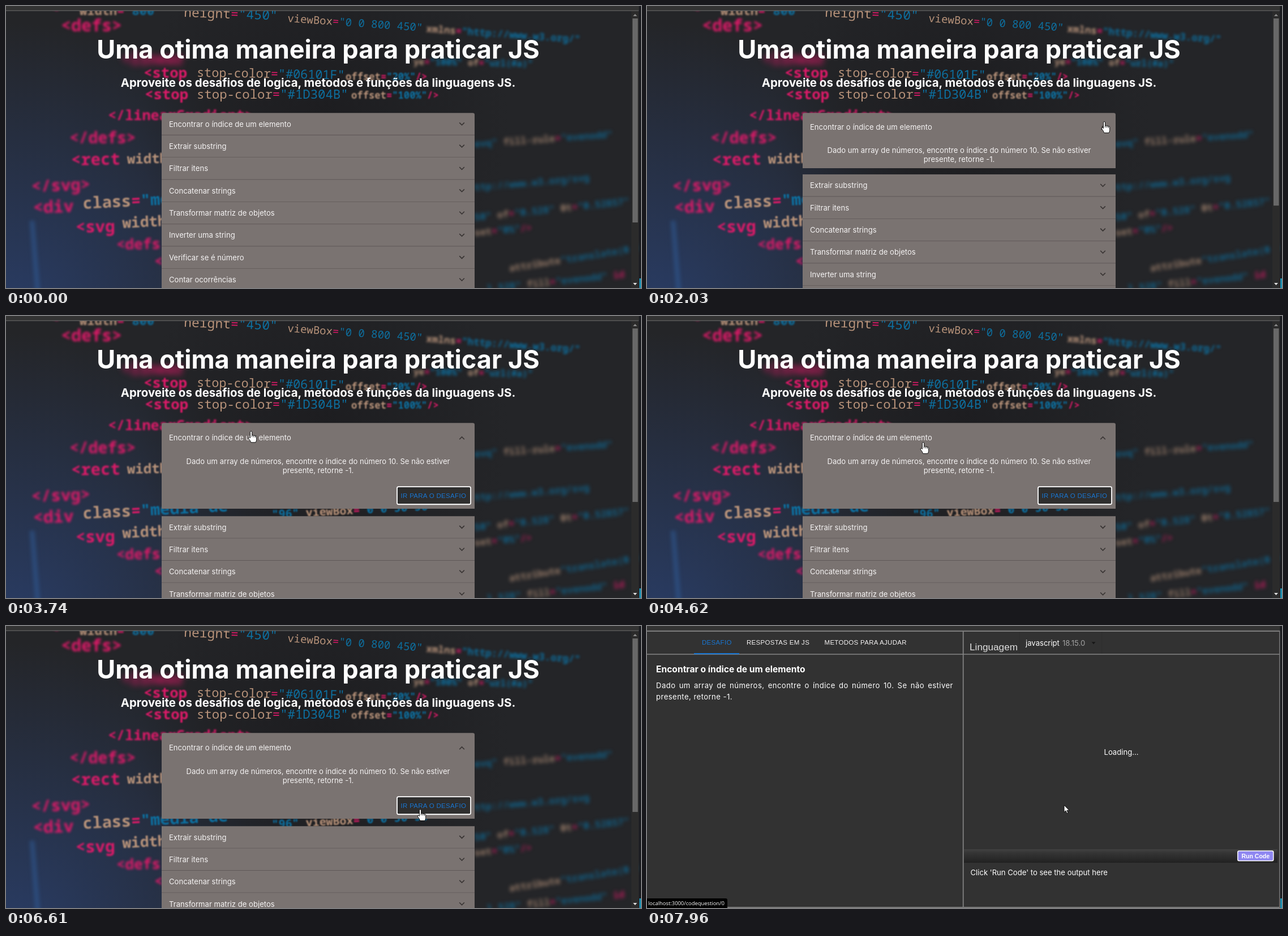
Animation, 1122 px wide and 499 px high, one loop 8000 ms. Source, as an HTML page with a canvas:

```html
<!DOCTYPE html>
<html lang="pt">
<head>
<meta charset="utf-8">
<title>Desafios JS</title>
<style>
  html, body { margin: 0; width: 100%; height: 100%; overflow: hidden; background: #232427; }
  canvas, body > svg { position: absolute; left: 0; top: 0; }
  svg { font: 13.1px Inter, sans-serif; font-optical-sizing: none; fill: #f5f3f3; }
  .mid { text-anchor: middle; }
  .bold { font-weight: 700; }
  .white { fill: #fff; }
  .caps { font: 11.47px "Liberation Sans", Arial, sans-serif; letter-spacing: .33px; }
  .field { font: 17.2px "Liberation Sans", Arial, sans-serif; fill: #dedede; }
  .run { font: bold 10.5px "Liberation Sans", Arial, sans-serif; fill: #fff; }
  .status { font: 9.4px "Open Sans", sans-serif; fill: #fff; }
  .card { fill: #7a7371; }
  .rule { fill: #5f5958; }
  .chevron { fill: #383433; }
  .brief { font: 13.1px/20px Inter, sans-serif; letter-spacing: .45px; text-align: justify; color: #fff; }
  .pointer { fill: #fff; stroke: #000; stroke-width: .9; stroke-linejoin: round; }
</style>
</head>
<body>
<canvas id="photo" width="1122" height="499"></canvas>
<svg width="1122" height="499" viewBox="0 0 1122 499">
  <defs>
    <path id="arrowIcon" d="M-4.9-2.5 0 2.4 4.9-2.5 3.76-3.65 0 .1-3.76-3.65z"/>
    <linearGradient id="bevel" x2="0" y2="1">
      <stop stop-color="#414141"/><stop offset=".3" stop-color="#343434"/><stop offset="1" stop-color="#212121"/>
    </linearGradient>
  </defs>

  <g id="home">
    <text class="mid bold white" x="551.5" y="93.3" font-size="45.05">Uma otima maneira para praticar JS</text>
    <text class="mid bold white" x="551.5" y="143.3" font-size="20.48">Aproveite os desafios de logica, metodos e funções da linguagens JS.</text>
    <path id="first" class="card"/>
    <text id="firstLabel" x="288">Encontrar o índice de um elemento</text>
    <use id="firstIcon" class="chevron" href="#arrowIcon"/>
    <svg id="details" x="275" width="553">
      <g class="mid">
        <text x="276.5" y="19.8">Dado um array de números, encontre o índice do número 10. Se não estiver</text>
        <text x="276.5" y="35.9">presente, retorne -1.</text>
      </g>
      <rect id="button" x="416" y="60.3" width="130" height="31.2" rx="2.5" stroke="#fff" stroke-width="1.8"/>
      <text class="caps" x="422.5" y="79.8" fill="#1976d2">IR PARA O DESAFIO</text>
    </svg>
    <g id="rest"></g>
    <path fill="#2b2b2b" d="M1105 9h13v490h-13z"/>
    <rect id="thumb" x="1107" y="22" width="9.5" fill="#686868"/>
    <path fill="#8a8a8a" d="M1108 18h7l-3.5-4z"/>
    <path fill="#e0e0e0" d="M1108 490h7l-3.5 4z"/>
  </g>

  <g id="task">
    <path fill="#323232" d="M0 8h1119v491H0z"/>
    <path fill="#2e2e2e" d="M658 10h146v39H658z"/>
    <path fill="#323232" d="M659 10h144v39H659z"/>
    <path fill="none" stroke="#858585" stroke-width="1.7" d="M0 9.2h1118v488.6H0M0 50h1118M558.7 9v489"/>
    <g class="caps">
      <text x="97" y="32.6" fill="#1976d2">DESAFIO</text>
      <text x="176" y="32.6">RESPOSTAS EM JS</text>
      <text x="313.5" y="32.6">METODOS PARA AJUDAR</text>
      <path fill="#1976d2" d="M83 48h80v2H83z"/>
    </g>
    <text class="field" x="570" y="43">Linguagem</text>
    <text class="white" x="669" y="34.5">javascript</text>
    <text x="734" y="34.5" fill="#a2a2a2">18.15.0</text>
    <path fill="#161616" d="M785.5 28.3h7l-3.5 4z"/>
    <text class="bold white" x="16" y="81.7" font-size="15.6">Encontrar o índice de um elemento</text>
    <foreignObject x="16" y="94.5" width="525" height="60">
      <div class="brief">Dado um array de números, encontre o índice do número 10. Se não estiver presente, retorne -1.</div>
    </foreignObject>
    <text class="mid white" x="838" y="227.7">Loading...</text>
    <path fill="url(#bevel)" d="M560 395h554v24H560z"/>
    <rect x="1043.8" y="398" width="63" height="17.5" rx="2.5" fill="#8f87f1" stroke="#fff" stroke-width="1.5"/>
    <text class="mid run" x="1075.3" y="410.7">Run Code</text>
    <text class="white" x="571.5" y="440.8">Click 'Run Code' to see the output here</text>
  </g>

  <path fill="#333" d="M0 0h1122v8H0z"/>
  <path fill="#6c6c6c" d="M0 7.7h1118v1H0z"/>
  <path fill="#1b1c20" d="M1118.5 0h3.5v499h-3.5z"/>
  <path fill="#1f8fb0" d="M1119 482h3v17h-3z"/>
  <g id="status">
    <path d="M0 482h139q3 0 3 3v14H0z" fill="#000"/>
    <text class="status" x="2" y="494">localhost:3000/codequestion/0</text>
  </g>
  <g id="cursor" class="pointer">
    <path id="arrow" d="M0 0V12.5L2.9 9.8 5 14.6 7 13.7 5 9.2H9Z"/>
    <path id="hand" d="M-1.6 1.2a1.6 1.6 0 0 1 3.2 0V7q1.6-.8 3 .3 1.5-.6 2.8.5 2-.3 2.2 1.6v5q0 2.4-1.6 5.1h-8.2Q-1.5 16-4.6 12.2q-.7-1.6.9-2 1-.1 2.1 1.4zM1.6 7v3M4.6 7.3v3M7.4 7.8v3"/>
  </g>
</svg>

<script>
const $ = id => document.getElementById(id);
const set = (id, attrs) => Object.entries(attrs).forEach(([k, v]) => $(id).setAttribute(k, v));
const show = (id, on) => set(id, { visibility: on ? 'visible' : 'hidden' });
const clamp = v => Math.max(0, Math.min(1, v));

// Backdrop: dark gradient with defocused lines of code.
const inks = { p: '#dc1a68', t: '#b8937a', c: '#0d6f9f' };
// x, baseline, size, tilt in degrees, blur, text with ink marks
const codeLines = [
  [78, 12, 26, 0, 2, '~p<'],
  [130, 16, 22, 0, 1.5, '~twidth~p=~c"800"'],
  [314, 19, 23, 2, .6, '~theight~p=~c"450"'],
  [497, 28, 19, 4, .4, '~tviewBox~p=~c"0 0 800 450"'],
  [742, 46, 17.5, 4, 2, '~txmlns~p=~c"http://www.w3.org/"'],
  [97, 45, 30, 0, 2, '~p<defs>'],
  [205, 103, 26, 0, 6, '~p<linear'],
  [720, 104, 16, 1, 2.5, '~tye~p=~c"100%" ~tof~p=~c"url(#a)"'],
  [243, 127, 25.7, 0, 1, '~p<stop'],
  [337, 125, 21.8, 1, .3, '~tstop-color~p=~c"#06101F"'],
  [600, 131, 17.2, 0, 1, '~toffset~p=~c"20%"~p/>'],
  [245, 165, 25.7, 0, 1, '~p<stop'],
  [337, 164, 22.3, 0, .3, '~tstop-color~p=~c"#1D304B"'],
  [610, 164, 17.2, 0, 1, '~toffset~p=~c"100%"~p/>'],
  [180, 202, 25.2, 0, 1.4, '~p</linearGradient>'],
  [112, 243, 28, 0, 2, '~p</defs>'],
  [115, 282, 29, -1, 1.5, '~p<rect'],
  [214, 279, 24, -1, 1, '~twidth'],
  [45, 329, 29, -2, 2.2, '~p</svg>'],
  [48, 367, 30, -2, 2.2, '~p<div'],
  [136, 359, 28.5, -3, 1, '~tclass~p=~c"media de'],
  [123, 401, 29, -1, 1.5, '~p<svg'],
  [206, 393, 26, -3, 1, '~twidth'],
  [195, 431, 26, -1, 2, '~p<defs'],
  [262, 461, 26, 0, 2, '~p<'],
  [470, 358, 20, -3, .8, '~c"96" ~tviewBox~p=~c"0 0 50 50"']
];
// x, baseline, tilt, text: the far, strongly blurred part
const farLines = [
  [828, 250, -4, '~cevq" ~tfill-rule~p=~c"evenodd"'],
  [828, 327, -5, '~cttp://www.w3.org/svg'],
  [828, 380, -6, '~c50" ~tof~p=~c"0.528" ~t0t~p=~c"0.52857"'],
  [828, 407, -5, '~tset~p=~c"0%"~p/>'],
  [890, 470, -9, '~tattribute~c"translate(0 50)"'],
  [850, 506, -6, '~cl 528" ~tfill~p=~c"evenodd" ~pid']
];

function drawPhoto() {
  const c = $('photo').getContext('2d');
  const glow = (x, y, r, from, to) => {
    const g = c.createRadialGradient(x, y, 0, x, y, r);
    g.addColorStop(0, from);
    g.addColorStop(1, to);
    c.fillStyle = g;
    c.fillRect(0, 0, 1122, 499);
  };
  const line = (x, y, size, tilt, blur, text) => {
    c.save();
    c.translate(x, y);
    c.rotate(tilt * Math.PI / 180);
    c.filter = `blur(${blur}px)`;
    c.font = `${blur < .7 ? 400 : 700} ${size}px "Noto Sans Mono", monospace`;
    let at = 0;
    for (const part of text.split('~').slice(1)) {
      const run = part.slice(1);
      c.fillStyle = inks[part[0]];
      c.fillText(run, at, 0);
      at += c.measureText(run).width;
    }
    c.restore();
  };
  c.fillStyle = '#242528';
  c.fillRect(0, 0, 1122, 499);
  glow(20, 540, 510, '#293c64', '#293c6400');
  glow(560, 200, 330, '#1d1d20', '#1d1d2000');
  c.save();
  c.filter = 'blur(3px)';
  c.strokeStyle = '#2f5a9488';
  c.lineWidth = 9;
  c.beginPath();
  c.moveTo(46, 380);
  c.lineTo(56, 505);
  c.stroke();
  c.restore();
  codeLines.forEach(l => line(...l));
  c.globalAlpha = .8;
  farLines.forEach(([x, y, tilt, text]) => line(x, y, 17, tilt, 3, text));
}

// Accordion
const TOP = 189.3, ROW = 39.35, GROW = 13.1, BODY = 99.3;
const rows = ['Extrair substring', 'Filtrar itens', 'Concatenar strings', 'Transformar matriz de objetos',
  'Inverter uma string', 'Verificar se é número', 'Contar ocorrências'];
$('rest').innerHTML = `<path class="card" d="M275 0h553v${ROW * rows.length}H275z"/>` + rows.map((label, i) => `
  <g transform="translate(0 ${i * ROW})">
    <path id="rule${i}" class="rule" d="M275-.8h553v.9H275z"/>
    <text x="288" y="${ROW / 2 + 4.76}">${label}</text>
    <use class="chevron" href="#arrowIcon" x="805.5" y="${ROW / 2 + .4}"/>
  </g>`).join('');

// cubic-bezier(.4, 0, .2, 1)
function ease(x) {
  if (x <= 0 || x >= 1) return clamp(x);
  let lo = 0, hi = 1, s;
  for (let i = 0; i < 20; i++) {
    s = (lo + hi) / 2;
    const at = 1.2 * s * (1 - s) ** 2 + .6 * s * s * (1 - s) + s ** 3;
    if (at < x) lo = s; else hi = s;
  }
  return 3 * s * s * (1 - s) + s ** 3;
}

const bursts = [[120, 260], [590, 1360], [1420, 1750], [1890, 2640], [2780, 2850], [3050, 3820],
  [3880, 4620], [4690, 5460], [5530, 6000], [6400, 7010], [7350, 7960]];
function held(t) {
  const burst = bursts.filter(b => b[0] <= t).pop();
  if (!burst) return 0;
  const [start, end] = burst;
  return t >= end ? end : start + 70 * Math.floor((t - start) / 70);
}

// time, x, y of the pointer's tip
const path = [
  [120, 1021, 324], [190, 965, 195], [260, 911, 81], [530, 911, 81], [1000, 856, 152], [1360, 808, 211],
  [1560, 802, 197], [1750, 808, 205], [2170, 808, 205], [2640, 791, 204], [2710, 791, 204], [2850, 786, 204],
  [2980, 786, 204], [3430, 560, 219], [3820, 362, 196], [4100, 277, 215], [4620, 488, 224], [5040, 314, 258],
  [5460, 499, 311], [6000, 732, 281], [6330, 732, 281], [6610, 732, 325], [7010, 737, 317], [8000, 737, 317]
];
function tip(t) {
  const i = Math.max(1, path.findIndex(k => k[0] >= t));
  const [a, b] = [path[i - 1], path[i]];
  const f = clamp((t - a[0]) / (b[0] - a[0]));
  return [a[1] + (b[1] - a[1]) * f, a[2] + (b[2] - a[2]) * f];
}

function draw(now) {
  const t = held(now % 8000);
  const open = ease((t - 1945) / 150);
  const head = ROW + GROW * open;
  const body = BODY * ease((t - 1945) / 250);
  const bottom = TOP + head + body;
  const next = bottom + GROW * open;
  const mid = TOP + head / 2;

  set('first', { d: `M275 ${bottom}V${TOP + 3.3}q0-3.3 3.3-3.3h546.4q3.3 0 3.3 3.3V${bottom}z` });
  set('firstLabel', { y: mid + 4.76 });
  set('firstIcon', { transform: `translate(805.5 ${mid}) rotate(${180 * open}) translate(0 .4)` });
  set('details', { y: TOP + head, height: body });
  $('details').style.display = body > 0 ? '' : 'none';
  set('rest', { transform: `translate(0 ${next})` });
  set('rule0', { opacity: 1 - open });
  set('thumb', { height: 361 - .43 * (next - TOP - ROW) });

  const shade = Math.round(46 + 209 * ease((t - 6610) / 250));
  set('button', { fill: `rgb(${shade},${shade},${shade})` });

  const onTask = t >= 7960;
  show('home', !onTask);
  show('task', onTask);
  show('status', t >= 6680);

  const [x, y] = tip(t);
  const onHead = x > 275 && x < 828 && y > TOP && y < TOP + head;
  const onButton = body > 0 && x > 690 && x < 822 && y > 301 && y < 334;
  const hand = !onTask && (onHead || onButton);
  set('cursor', { transform: `translate(${x} ${y})` });
  $('cursor').style.display = t < 120 ? 'none' : '';
  show('hand', hand);
  show('arrow', !hand);
}

drawPhoto();
const began = performance.now();
(function tick() {
  draw(performance.now() - began);
  requestAnimationFrame(tick);
})();
</script>
</body>
</html>
```
